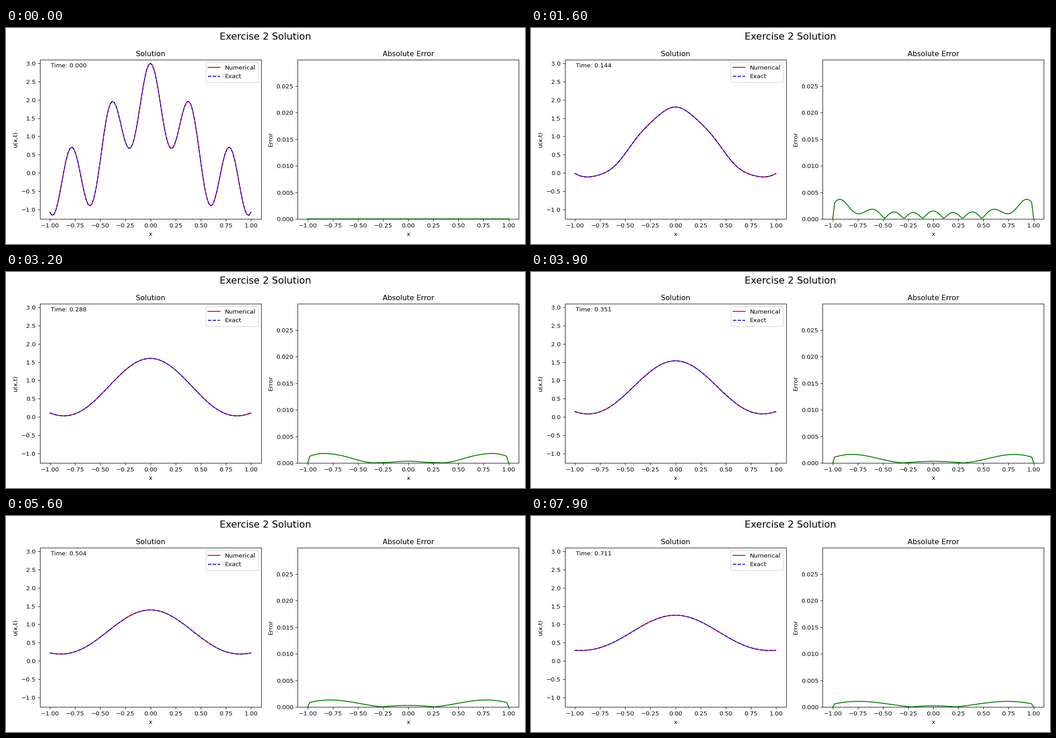
Write a matplotlib script that moves like this. It is 1159x483 px and loops after 8 s.

```python
import numpy as np
import matplotlib.pyplot as plt
from matplotlib.animation import FuncAnimation

plt.rcParams["font.family"] = "DejaVu Sans"

# Stage
W, H = 1159, 483
DPI = 1159 / 12
FRAMES, INTERVAL = 80, 100

# Heat equation u_t = ALPHA * u_xx on [-1, 1], explicit scheme
ALPHA = 0.1
MODES = (1, 4, 16)
x = np.linspace(-1, 1, 101)
dx = 0.02
dt = 0.9 * dx**2 / (2 * ALPHA)
ratio = ALPHA * dt / dx**2
STEPS_PER_FRAME = 5


def exact(x, t):
    return sum(np.exp(-ALPHA * k**2 * t) * np.cos(k * x) for k in MODES)


def solve():
    """Return the numerical solution at every displayed time."""
    u = exact(x, 0)
    history = [u.copy()]
    for step in range(1, (FRAMES - 1) * STEPS_PER_FRAME + 1):
        # Boundary values are set for the new time before the interior update.
        u[[0, -1]] = exact(x[[0, -1]], step * dt)
        u[1:-1] += ratio * (u[2:] - 2 * u[1:-1] + u[:-2])
        if step % STEPS_PER_FRAME == 0:
            history.append(u.copy())
    return history


def add_panel(left, right, title, ylabel, ylim):
    top, bottom = 70.6, 427.0
    ax = fig.add_axes([left / W, 1 - bottom / H,
                       (right - left) / W, (bottom - top) / H])
    ax.set(title=title, xlabel="x", ylabel=ylabel,
           xlim=(-1.1, 1.1), ylim=ylim)
    ax.set_xticks(np.linspace(-1, 1, 9))
    return ax


history = solve()
start = history[0]

# The tiny offset keeps the pixel size from truncating downwards.
fig = plt.figure(figsize=((W + 1e-6) / DPI, (H + 1e-6) / DPI), dpi=DPI)
fig.suptitle("Exercise 2 Solution", fontsize=16)

ax_sol = add_panel(75.5, 569.5, "Solution", "u(x,t)",
                   (start.min() - 0.1, start.max() + 0.1))
ax_err = add_panel(651.3, 1145.0, "Absolute Error", "Error", (0, 0.02998))

num_line, = ax_sol.plot(x, start, "r-", label="Numerical")
exact_line, = ax_sol.plot(x, start, "b--", label="Exact")
err_line, = ax_err.plot(x, np.zeros_like(x), "g-")
clock = ax_sol.text(0.05, 0.95, "", transform=ax_sol.transAxes)
ax_sol.legend(loc="upper right")


def update(i):
    t = i * STEPS_PER_FRAME * dt
    u, ref = history[i], exact(x, t)
    num_line.set_ydata(u)
    exact_line.set_ydata(ref)
    err_line.set_ydata(np.abs(u - ref))
    clock.set_text(f"Time: {t:.3f}")
    return num_line, exact_line, err_line, clock


anim = FuncAnimation(fig, update, frames=FRAMES, interval=INTERVAL,
                     repeat=True, repeat_delay=0)
plt.show()
```
